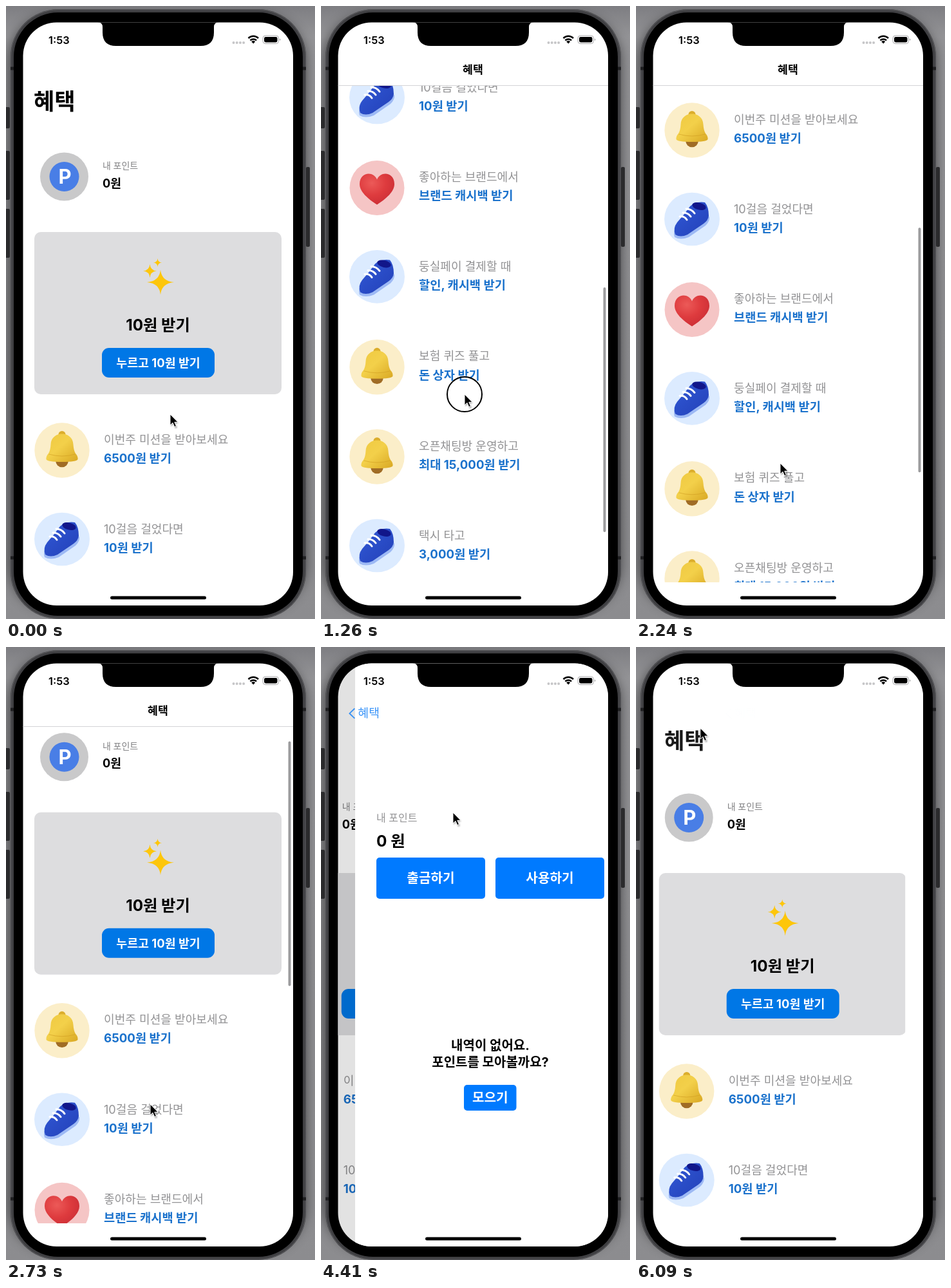
Write an HTML page that moves like this. It is 480x952 px and loops after 6.16 s.

```html
<!DOCTYPE html>
<html lang="ko">
<head>
<meta charset="utf-8">
<title>혜택</title>
<style>
  html, body { margin: 0; width: 100%; height: 100%; overflow: hidden; background: #88888b; }
  svg { display: block; width: 100vw; height: 100vh; }
  text { font-family: Inter, "Noto Sans CJK KR", "Noto Sans CJK", sans-serif; white-space: pre; }
</style>
</head>
<body>
<svg id="stage" viewBox="0 0 480 952">
  <defs>
    <linearGradient id="desk" x2="0" y2="1">
      <stop stop-color="#7e7e82"/><stop offset=".05" stop-color="#939396"/><stop offset="1" stop-color="#8c8c8f"/>
    </linearGradient>
    <linearGradient id="gold" x2="1" y2="1">
      <stop stop-color="#efc941"/><stop offset=".45" stop-color="#f3d04a"/><stop offset="1" stop-color="#d9a823"/>
    </linearGradient>
    <linearGradient id="blue" x2="1" y2="1">
      <stop stop-color="#3159d6"/><stop offset="1" stop-color="#2340b8"/>
    </linearGradient>
    <radialGradient id="red" cx=".35" cy=".3" r=".8">
      <stop stop-color="#ec5a58"/><stop offset=".5" stop-color="#de3b3e"/><stop offset="1" stop-color="#c92c34"/>
    </radialGradient>
    <filter id="soft"><feGaussianBlur stdDeviation="1"/></filter>
    <filter id="shade" x="-10%" y="-10%" width="120%" height="120%"><feGaussianBlur stdDeviation="9"/></filter>
    <clipPath id="screenClip"><rect x="26.500" y="25.500" width="419.500" height="905.500" rx="52"/></clipPath>
    <clipPath id="listClip"><rect id="listArea" x="26" width="420"/></clipPath>
    <clipPath id="titleClip"><rect x="26" y="123" width="420" height="200"/></clipPath>

    <g id="bell">
      <circle r="42.7" fill="#fbeec9"/>
      <circle cy="16.500" r="9.800" fill="#a06c25"/>
      <circle cy="-24.500" r="5.500" fill="#dcae2c"/>
      <path fill="url(#gold)" d="M-24.500 14Q-25 9-21 5Q-18 0-17.500-9C-17-31 17-31 17.500-9Q18 0 21 5Q25 9 24.500 14Q23 18 0 18T-24.500 14Z"/>
      <path fill="none" stroke="#cf9c20" stroke-opacity=".6" d="M-20.500 6Q0 12 20.500 6"/>
    </g>
    <g id="shoe">
      <ellipse rx="43" ry="41.3" fill="#dcebff"/>
      <path fill="#9db9f4" d="M27-4Q28 3 21 10L-5 28Q-18 33-27 28Q-29 23-27 17Z"/>
      <path fill="url(#blue)" d="M-3-20Q6-28 20-26Q26-19 26-5Q25 2 18 7L-7 24Q-18 29-26 24Q-30 14-23 5Q-13-6-3-20Z"/>
      <ellipse cx="11" cy="-20" rx="11" ry="5.500" fill="#11168a" transform="rotate(14 11 -20)"/>
      <path fill="none" stroke="#fff" stroke-width="3" stroke-linecap="round"
        d="M-19-4Q-12-5-8 1M-14-10Q-6-10-2-4M-9-16Q-1-16 4-9"/>
    </g>
    <g id="heart">
      <circle r="42.5" fill="#f5c5c5"/>
      <path fill="url(#red)" d="M0 26C-14 17-27 6-27-6C-27-24-6-27 0-13C6-27 27-24 27-6C27 6 14 17 0 26Z"/>
    </g>
  </defs>

  <rect width="480" height="952" fill="url(#desk)"/>
  <rect x="4" y="14" width="462" height="925" rx="72" opacity=".5" filter="url(#shade)"/>
  <g fill="#2b2b2d">
    <rect x="-3" y="157" width="9" height="33" rx="2"/>
    <rect x="-3" y="225" width="9" height="76" rx="2"/>
    <rect x="-3" y="315" width="9" height="76" rx="2"/>
    <rect x="466" y="250" width="6" height="124" rx="2"/>
  </g>
  <rect x="7" y="5" width="459" height="947" rx="74" fill="#3f3f42"/>
  <rect x="8" y="6" width="457" height="945" rx="73" fill="none" stroke="#5b5b5e"/>
  <path stroke="#1e1e20" stroke-width="5" d="M7 97h5M7 857h5M461 97h5M461 857h5"/>
  <rect x="12" y="10" width="449" height="937" rx="69"/>

  <g clip-path="url(#screenClip)">
    <rect x="26" y="25" width="420" height="906" fill="#fff"/>
    <g id="home">
      <g clip-path="url(#listClip)"><g id="list"></g></g>
      <path id="rule" d="M26 123.5h420" stroke="#d4d4d6"/>
      <g id="smallTitle"></g>
      <rect id="bar" x="438.5" width="4" rx="2" fill="#9c9c9e"/>
    </g>
    <rect id="dim" x="26" y="25" width="420" height="906"/>
    <g id="detail"></g>
    <g id="titleBox"><g id="bigTitle"></g></g>
    <g id="back"><path d="M45.5 95.5l-8 7.7 8 7.7" fill="none" stroke="#1f86f8" stroke-width="1.8"/></g>
    <g id="status">
      <path d="M142 25q8 0 8 8v8q0 21 21 21h131q21 0 21-21v-8q0-8 8-8z"/>
      <path d="M353.5 57h16" stroke="#c6c6c8" stroke-width="4" stroke-linecap="round" stroke-dasharray="0 5.2"/>
      <path fill="none" stroke="#000" stroke-width="2.500" d="M376.500 50a11 11 0 0 1 15.500 0M379.400 53.400a7 7 0 0 1 9.700 0"/>
      <path d="M384.200 58.500l-3-3.200a4.400 4.400 0 0 1 6 0z"/>
      <rect x="399" y="46" width="24.500" height="12.500" rx="4" fill="none" stroke="#a9a9ab"/>
      <rect x="401" y="48" width="20.500" height="8.500" rx="2.400"/>
      <path d="M425 50.500q3 1.700 0 3.500z" fill="#a9a9ab"/>
      <rect x="162" y="916.500" width="149" height="5" rx="2.500"/>
    </g>
  </g>

  <g id="cursor">
    <circle id="press" r="27" fill="none" stroke="#000" stroke-width="2"/>
    <path d="M1 2V19L5 15 8 22 11 21 8 14H13Z" opacity=".35" filter="url(#soft)"/>
    <path d="M0 0V17L4 13.300 6.700 19.600 9.500 18.400 6.800 12.300H12Z" stroke="#fff" stroke-width="1"/>
  </g>
</svg>

<script>
const LOOP = 6160, STEP = 70;
const GREY = '#929294', LINK = '#1b72cc', ACTION = '#0077e6', SYSTEM = '#007aff';
const $ = id => document.getElementById(id);
const add = (id, markup) => $(id).insertAdjacentHTML('beforeend', markup);
const clamp = v => Math.max(0, Math.min(1, v));
const mix = (a, b, k) => a + (b - a) * k;

// y is the optical middle of the line
const label = (x, y, size, words, { fill = '#000', weight = 700, anchor = 'start' } = {}) =>
  `<text x="${x}" y="${y + size * .37}" font-size="${size}" font-weight="${weight}" fill="${fill}" text-anchor="${anchor}">${words}</text>`;
const middle = (x, y, size, words, fill) => label(x, y, size, words, { fill, anchor: 'middle' });
const box = (x, y, w, h, r, fill) =>
  `<rect x="${x}" y="${y}" width="${w}" height="${h}" rx="${r}" fill="${fill}"/>`;
const button = (x, y, w, h, r, size, words, fill) =>
  box(x, y, w, h, r, fill) + middle(x + w / 2, y + h / 2, size, words, '#fff');
const sparkle = (x, y, rx, ry) =>
  `<path transform="translate(${x} ${y}) scale(${rx} ${ry})" fill="#fdc60b" d="M0-1Q.08-.08 1 0Q.08.08 0 1Q-.08.08-1 0Q-.08-.08 0-1Z"/>`;

const rows = [
  ['bell', '이번주 미션을 받아보세요', '6500원 받기'],
  ['shoe', '10걸음 걸었다면', '10원 받기'],
  ['heart', '좋아하는 브랜드에서', '브랜드 캐시백 받기'],
  ['shoe', '둥실페이 결제할 때', '할인, 캐시백 받기'],
  ['bell', '보험 퀴즈 풀고', '돈 상자 받기'],
  ['bell', '오픈채팅방 운영하고', '최대 15,000원 받기'],
  ['shoe', '택시 타고', '3,000원 받기'],
];

add('list',
  '<circle cx="90.5" cy="265" r="37.5" fill="#c9c9ca"/><circle cx="90.5" cy="265" r="23" fill="#497ee6"/>' +
  middle(91.5, 265, 31, 'P', '#fff') +
  label(150, 248, 14, '내 포인트', { fill: '#808083', weight: 500 }) +
  label(150, 275, 18.2, '0원') +
  box(44, 351, 384, 252, 10, '#dddddf') +
  sparkle(240, 429, 21, 19.5) + sparkle(223.5, 411.5, 10.5, 10.5) + sparkle(235.5, 398.5, 6.5, 6.5) +
  middle(236, 495, 24.3, '10원 받기') +
  button(149, 531, 175, 46, 11, 18.4, '누르고 10원 받기', ACTION) +
  rows.map(([icon, lead, offer], i) => {
    const y = 673 + i * 139.2;
    return `<use href="#${icon}" x="87" y="${y + (icon == 'shoe' ? 15.8 : 17)}"/>` +
      label(152, y, 18.1, lead, { fill: GREY, weight: 400 }) +
      label(152, y + 28.8, 18.7, offer, { fill: LINK });
  }).join(''));

add('detail',
  box(27, 25, 420, 906, 0, '#fff') +
  label(60, 265, 16, '내 포인트', { fill: GREY, weight: 400 }) +
  label(60, 301, 24.4, '0 원') +
  button(60, 327, 169, 64, 5, 20.2, '출금하기', SYSTEM) +
  button(245, 327, 169, 64, 5, 20.2, '사용하기', SYSTEM) +
  middle(237, 619, 20, '내역이 없어요.') +
  middle(237, 645, 20, '포인트를 모아볼까요?') +
  button(196, 680, 81.5, 40, 5, 20.2, '모으기', SYSTEM));

add('smallTitle', middle(236, 99, 17.3, '혜택'));
add('bigTitle', label(0, 0, 35.2, '혜택'));
add('back', label(50.5, 102, 18.3, '혜택', { fill: '#1f86f8', weight: 400 }));
add('status', label(66, 52.5, 16.4, '1:53', { weight: 600 }));

// Each key is [time, value, ...]; values follow a monotone cubic curve.
const SCROLL = [[70, 0], [210, 30], [350, 110], [630, 362], [900, 545], [1190, 682], [1260, 686],
  [1700, 650], [2100, 590], [2240, 497], [2500, 270], [2800, 50], [2900, 2], [3010, -18],
  [3200, -7], [3360, -1.5], [3640, 0]];
const POINTER = [[70, 255, 634], [210, 248, 604], [350, 232, 534], [700, 232, 534], [1120, 223, 603],
  [1260, 223, 603], [1700, 223, 639], [2100, 224, 699], [2180, 224, 710], [3000, 224, 710],
  [3360, 224, 567], [3780, 205, 257], [4760, 205, 257], [5110, 100, 106], [5180, 100, 106],
  [5460, 81, 104], [5810, 81, 104], [6090, 100, 126]];
const PRESSES = [[30, 400], [1130, 2180], [3800, 4060], [5690, 5850]];

function track(keys, t, c = 1) {
  const last = keys.length - 1;
  if (t <= keys[0][0]) return keys[0][c];
  if (t >= keys[last][0]) return keys[last][c];
  const i = keys.findIndex(k => k[0] > t) - 1;
  const rate = j => keys[j + 1] && keys[j] ? (keys[j + 1][c] - keys[j][c]) / (keys[j + 1][0] - keys[j][0]) : 0;
  const slope = j => {
    const a = rate(j - 1), b = rate(j);
    return a * b <= 0 ? 0 : 2 * a * b / (a + b);
  };
  const [a, b] = [keys[i], keys[i + 1]], span = b[0] - a[0], k = (t - a[0]) / span, q = 1 - k;
  return a[c] * (1 + 2 * k) * q * q + b[c] * k * k * (3 - 2 * k) +
    span * k * q * (slope(i) * q - slope(i + 1) * k);
}

// Critically damped spring
const spring = ms => {
  const u = .016 * Math.max(0, ms);
  return 1 - (1 + u) * Math.exp(-u);
};

const move = (id, x, y, scale = 1) => $(id).setAttribute('transform', `translate(${x} ${y}) scale(${scale})`);
const fade = (id, v) => $(id).setAttribute('opacity', clamp(v));
const extent = (id, y, h) => { $(id).setAttribute('y', y); $(id).setAttribute('height', h); };

function draw(t) {
  const scroll = track(SCROLL, t);
  const collapse = clamp(scroll / 59);
  const push = spring(t - 4130) - spring(t - 5815);

  move('list', 0, -scroll);
  const listTop = mix(182, 123, collapse);
  extent('listArea', listTop, 895 - listTop);
  fade('rule', (scroll - 50) / 9);
  fade('smallTitle', (scroll - 40) / 19);
  const barTop = scroll > 59 ? 278 + (scroll - 362) * .491 : mix(182, 129.2, collapse);
  extent('bar', barTop, mix(326, 380, collapse) + Math.min(0, scroll));
  fade('bar', Math.min((t - 20) / 100, (3700 - t) / 200));

  move('home', -125 * push, 0);
  fade('dim', .13 * push * push);
  move('detail', 419 * (1 - push), 0);
  move('bigTitle', mix(43, 57, push), mix(148, 102, push) - scroll, mix(1, .52, push));
  fade('bigTitle', 1 - 1.6 * push);
  if (push > 0) $('titleBox').removeAttribute('clip-path');
  else $('titleBox').setAttribute('clip-path', 'url(#titleClip)');
  move('back', 110 * (1 - push), 0);
  fade('back', push * push);

  move('cursor', track(POINTER, t, 1), track(POINTER, t, 2));
  fade('press', Math.max(...PRESSES.map(([a, b]) => Math.min((t - a) / 100, (b - t) / 100))));
}

const start = performance.now();
function tick() {
  const t = (performance.now() - start) % LOOP;
  draw(Math.floor(t / STEP) * STEP);
  requestAnimationFrame(tick);
}
tick();
</script>
</body>
</html>
```
